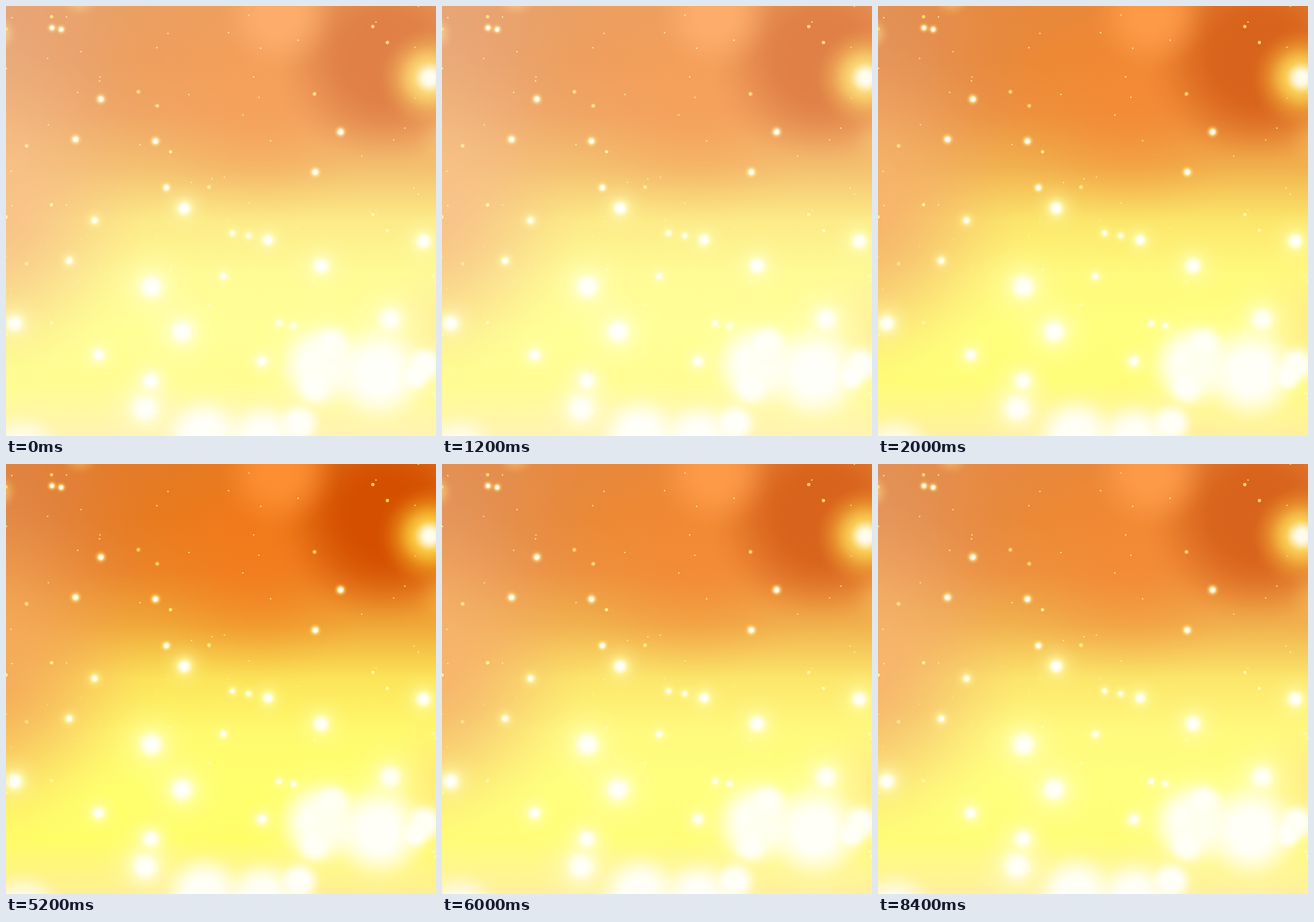
Recreate the animation shown at these times as an HTML page with a canvas. Size 748x748 px, loop 10000 ms.

```html
<!DOCTYPE html>
<html lang="en">
<head>
<meta charset="utf-8">
<title>Golden sparkle</title>
<style>
  html, body { margin: 0; width: 100%; height: 100%; overflow: hidden; background: #fff; }
  canvas { display: block; width: 100vw; height: 100vh; animation: wash 10s step-end infinite; }
  @keyframes wash {
    0% { opacity: .725; }
    20% { opacity: .893; }
    40% { opacity: 1; }
    60%, 100% { opacity: .893; }
  }
</style>
</head>
<body>
<canvas id="sky" width="748" height="748"></canvas>
<script>
const SIZE = 748;
const WHITE = '255,255,248';
const ctx = document.getElementById('sky').getContext('2d');

function paintSky() {
  const g = ctx.createLinearGradient(0, 0, 0, SIZE);
  const colors = ['#e47a24', '#e87a1e', '#eb8428', '#f0a838', '#fce45a', '#fffa6e', '#ffff6e', '#fffd68', '#ffef94'];
  colors.forEach((color, i) => g.addColorStop(i / (colors.length - 1), color));
  ctx.fillStyle = g;
  ctx.fillRect(0, 0, SIZE, SIZE);
}

// Round light: solid up to the core share of r, then a smoothstep fall to nothing
function glow(x, y, r, rgb, alpha = 1, core = 0) {
  const g = ctx.createRadialGradient(x, y, core * r, x, y, r);
  for (let t = 0; t <= 1; t += .125) {
    const fall = 1 - t * t * (3 - 2 * t);
    g.addColorStop(t, `rgba(${rgb},${alpha * fall})`);
  }
  ctx.fillStyle = g;
  ctx.fillRect(x - r, y - r, 2 * r, 2 * r);
}

// Halos pale towards the bottom of the stage
const haloAt = y => `255,${Math.min(255, 215 + y * .1)},${85 + y * .2}`;

function star(x, y, s) {
  if (y > 330) glow(x, y, s * 5, haloAt(y), .35);
  glow(x, y, s * 2.7, haloAt(y), .9);
  glow(x, y, s * 1.6, WHITE, 1, .2);
}

function cloud(x, y, r) {
  glow(x, y, r * 1.5, '255,255,200', .4);
  glow(x, y, r, WHITE, 1, .28);
}

function dot(x, y, r, color) {
  ctx.fillStyle = color;
  ctx.beginPath();
  ctx.arc(x, y, r, 0, 2 * Math.PI);
  ctx.fill();
}

let seed = 11;
function random() {
  seed = (seed * 16807) % 2147483647;
  return seed / 2147483647;
}

// One random band of dust, repeated down the stage
function paintDust() {
  for (let i = 0; i < 46; i++) {
    const x = random() * SIZE;
    const top = random() * 313 - 100;
    for (const drop of [0, 327, 532]) {
      const y = top + drop;
      const fade = y > 400 ? .5 : .9;
      if (i % 8 === 0) dot(x, y, 3, `rgba(${haloAt(y)},${fade})`);
      else if (i % 8 === 4) glow(x, y, 5, haloAt(y), fade, .2);
      else dot(x, y, 1.2, `rgba(255,243,165,${fade})`);
    }
  }
}

function paintLights() {
  glow(-30, 80, 330, '222,134,74', .9);
  glow(-50, 350, 330, '245,170,90', .95, .1);
  glow(440, 150, 240, '245,122,24', .7);
  glow(660, 90, 200, '212,80,0', 1, .3);
  glow(474, 15, 110, '255,144,52', .9, .2);
  glow(-12, 48, 34, '250,200,110', .9);
  glow(128, -16, 38, '250,190,100', .8);
  glow(765, 235, 60, '245,180,70', .5);
  glow(780, 560, 150, '255,226,125', .7);
  glow(30, 780, 80, WHITE, .95, .2);
}

function paintSun(x, y) {
  glow(x, y, 92, '248,190,45', .95, .15);
  glow(x, y, 58, '255,218,90', .9);
  glow(x, y, 30, '255,252,235', 1, .2);
}

paintSky();
paintLights();
paintDust();
paintSun(737, 125);

// Leaning pairs
for (const [x, y] of [[165, 162], [582, 219], [154, 373]]) {
  star(x, y, 4.8);
  star(x - 44, y + 70, 4.8);
}
// Level pairs
for (const [x, y, gap] of [[80, 38, 16], [394, 395, 28], [475, 552, 25]]) {
  star(x, y, 4);
  star(x + gap, y + gap / 6, 4);
}
for (const [x, y, s] of [
  [260, 235, 4.6], [279, 316, 4.6], [310, 352, 10], [253, 488, 17], [306, 566, 16],
  [242, 700, 17], [252, 652, 11], [161, 607, 8], [15, 552, 11], [445, 618, 7],
  [378, 470, 5], [456, 407, 8], [548, 452, 12], [726, 409, 11], [668, 545, 16]
]) star(x, y, s);

for (const [x, y, r] of [
  [548, 624, 84], [567, 588, 36], [537, 662, 36], [649, 638, 94],
  [728, 624, 38], [712, 645, 28], [345, 750, 80], [447, 756, 76], [510, 726, 40]
]) cloud(x, y, r);
</script>
</body>
</html>
```
